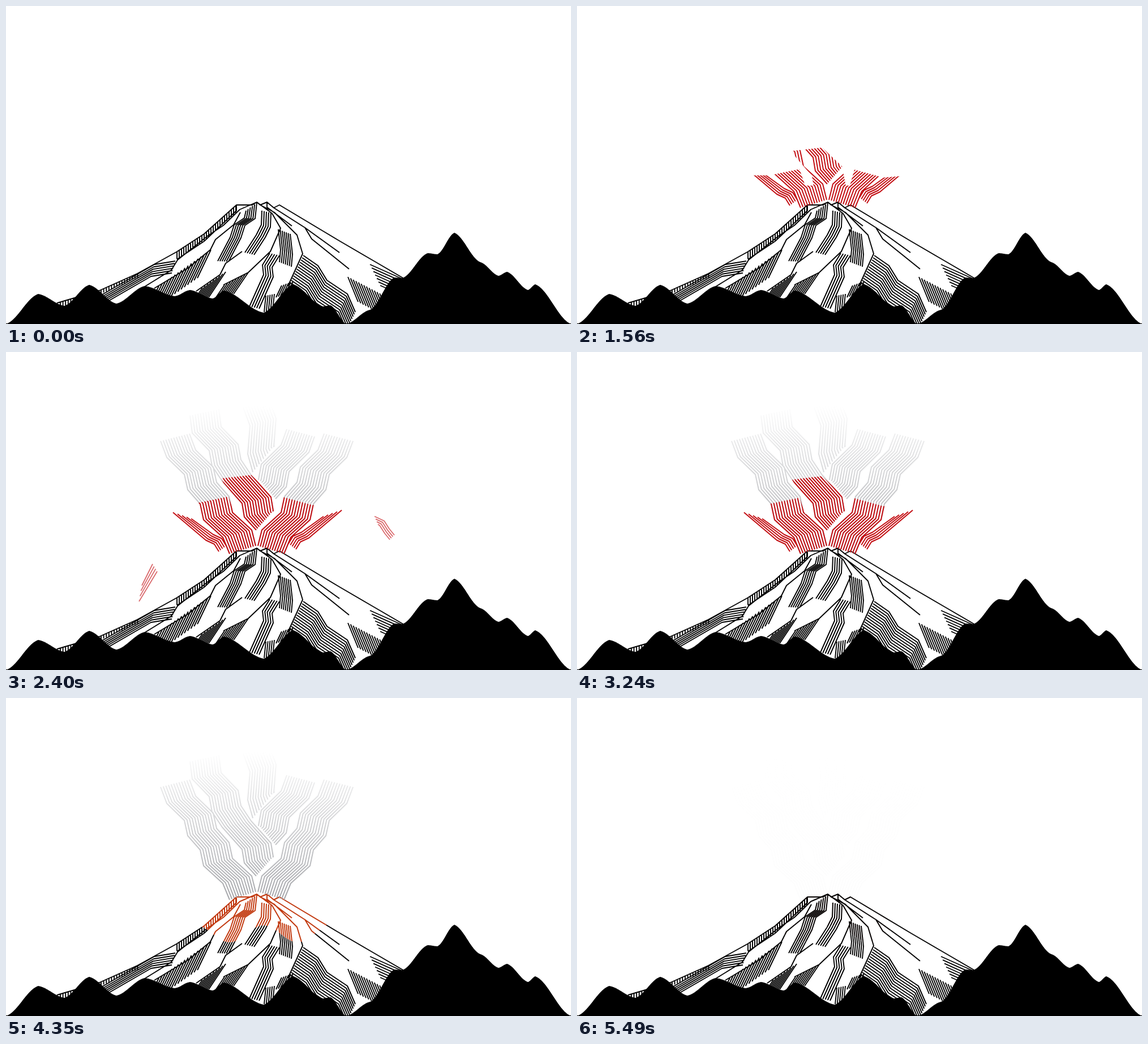
Write an HTML page with a canvas that moves like this. It is 998 px wide and 561 px high and loops after 5520 ms.

```html
<!DOCTYPE html>
<html lang="en">
<head>
<meta charset="utf-8">
<title>Volcano</title>
<style>
html, body { margin: 0; width: 100%; height: 100%; overflow: hidden; background: #fff; }
canvas { display: block; width: 998px; height: 561px; }
</style>
</head>
<body>
<canvas id="stage" width="998" height="561"></canvas>
<script>
const ctx = document.getElementById('stage').getContext('2d');
const W = 998, H = 561, LOOP = 5520, STEP = 30;
const RED = '#c30f14', ORANGE = [194, 58, 16];
const MIRROR = 885; // x + mirrored x around the crater

const clamp = (v, lo = 0, hi = 1) => Math.max(lo, Math.min(hi, v));
const ramp = (t, a, b) => clamp((t - a) / (b - a));
const ease = p => (1 - Math.cos(Math.PI * p)) / 2;

function line(path, pts) {
  pts.forEach((v, i) => {
    if (i % 2) path[i > 1 ? 'lineTo' : 'moveTo'](pts[i - 1], v);
  });
}

// n parallel copies of a polyline; the last copy may start at its own foot
function sheet(path, n, pts, dx, dy, foot = [pts[0] + dx, pts[1] + dy]) {
  for (let i = 0; i < n; i++) {
    const k = i / (n - 1);
    line(path, pts.map((v, j) => v + k * (j < 2 ? foot[j] - v : j % 2 ? dy : dx)));
  }
}

// height of a polyline at x; bend rounds it off at the key points
function height(pts, x, bend = 0) {
  let i = 0;
  while (i < pts.length - 4 && x > pts[i + 2]) i += 2;
  const p = ramp(x, pts[i], pts[i + 2]);
  return pts[i + 1] + (pts[i + 3] - pts[i + 1]) * (p + bend * (ease(p) - p));
}

// foreground: peaks and valleys joined by soft slopes
const skyline = [0, 561, 57, 508, 103, 529, 147, 492, 195, 525, 245, 494, 298, 512, 325, 501, 365, 516,
  385, 502, 455, 541, 507, 491, 560, 530, 573, 528, 601, 561, 643, 536, 686, 479, 700, 480, 745, 436,
  762, 438, 792, 400, 838, 452, 870, 476, 885, 469, 922, 501, 935, 491, 998, 561];
const hills = new Path2D();
hills.moveTo(0, H);
for (let x = 0; x <= W; x++) hills.lineTo(x, height(skyline, x, 0.65));
hills.closePath();

// volcano: outline
const cone = new Path2D();
const ridge = [90, 524, 165, 502, 232, 472, 301, 434, 350, 402, 407, 351];
line(cone, [...ridge, 435, 351, 443, 346, 449, 351, 461, 346, 473, 356, 483, 351, 590, 415, 705, 482]);
for (const [from, to, gap, len] of [[302, 407, 4, 13], [168, 233, 4.6, 7], [96, 134, 4.6, 9]])
  for (let x = from; x <= to; x += gap) line(cone, [x, height(ridge, x), x, height(ridge, x) + len]);
line(cone, [302, 447, 350, 415, 407, 361, 407, 351]);

// folds running down from the crater
line(cone, [443, 346, 413, 359, 384, 387, 357, 405, 303, 448, 292, 466, 245, 495]);
line(cone, [414, 364, 402, 386, 370, 412, 361, 430, 322, 462, 262, 498]);
line(cone, [443, 346, 470, 366, 485, 392, 467, 433, 428, 470, 384, 492]);
line(cone, [461, 346, 461, 355, 505, 388]);
line(cone, [449, 351, 474, 364, 514, 404, 524, 437, 498, 494]);
line(cone, [473, 356, 528, 391, 540, 411, 606, 464]);
line(cone, [528, 391, 589, 435]);
line(cone, [417, 433, 388, 454, 378, 474, 336, 503]);

// hatched faces, left to right
sheet(cone, 6, [165, 512, 262, 456, 299, 450], -6, 21);
sheet(cone, 17, [362, 430, 338, 480], -92, 64);
sheet(cone, 6, [424, 361, 421, 374, 403, 386, 396, 408, 374, 450], 19, 1, [443, 347]);
sheet(cone, 9, [388, 469, 358, 514], -41, 28);
sheet(cone, 9, [428, 470, 402, 508], -42, 22);
sheet(cone, 5, [452, 361, 451, 386, 442, 404, 422, 435], 16, 4);
sheet(cone, 5, [466, 436, 453, 457, 455, 474, 430, 530], 17, 4);
sheet(cone, 7, [481, 394, 485, 430, 483, 452], 21, 8);
sheet(cone, 5, [459, 511, 456, 540], 15, -3);
sheet(cone, 6, [487, 493, 477, 514], 20, -7);
sheet(cone, 13, [525, 440, 551, 458, 567, 484, 603, 508, 617, 540], -23, 48);
sheet(cone, 13, [604, 478, 622, 522], 56, 29);
sheet(cone, 7, [643, 456, 699, 481], 18, 37);

// plume: the right side mirrors the left
const smoke = new Path2D(), lava = new Path2D();
const side = new Path2D(), mid = new Path2D(), wing = new Path2D();
sheet(side, 12, [395, 356, 383, 327, 349, 296, 343, 268, 321, 243, 315, 216, 284, 186, 273, 157],
  51, -13, [441, 342]);
sheet(mid, 12, [442, 314, 421, 291, 417, 267, 382, 228, 364, 201, 359, 174, 329, 143, 325, 112],
  51, -11, [471, 281]);
sheet(wing, 5, [295, 283, 353, 332, 368, 339, 376, 352], 13, -10, [327, 294]);
for (const p of [smoke, lava]) {
  p.addPath(mid);
  p.addPath(side);
  p.addPath(side, { a: -1, d: 1, e: MIRROR + 1, f: 0 });
}
sheet(smoke, 11, [436, 212, 427, 180, 431, 130, 419, 98], 46, -13, [474, 165]);
sheet(smoke, 12, [476, 259, 495, 238, 500, 211, 535, 177, 545, 149], -49, -13, [446, 224]);
lava.addPath(wing);
lava.addPath(wing, { a: -1, d: 1, e: MIRROR + 3, f: -4 });

const [rockA, rockB, rockC] = [0, 0, 0].map(() => new Path2D());
sheet(rockA, 4, [217, 330, 227, 315], 6, 9, [209, 351]);
sheet(rockB, 4, [240, 412, 259, 374], 8, 13, [235, 440]);
sheet(rockC, 4, [621, 270, 638, 278, 647, 292, 656, 303], -8, 8, [627, 284]);

const grey = ctx.createLinearGradient(0, 350, 0, 95);
grey.addColorStop(0, '#a7a8ac');
grey.addColorStop(1, '#fff');

function stroke(path, color, width = 2) {
  ctx.strokeStyle = color;
  ctx.lineWidth = width;
  ctx.stroke(path);
}

function clipped(mask, draw) {
  ctx.save();
  ctx.clip(mask);
  draw();
  ctx.restore();
}

// wavy-edged heat spreading from the crater
function drawGlow(t, life) {
  const s = ramp(t, 3430, 4350);
  if (!s) return;
  const mask = new Path2D();
  const add = (x, y) => mask.lineTo(450 + (x - 450) * s, 345 + (y - 345) * s);
  add(346, 333);
  for (let x = 346; x <= 566; x += 4) add(x, 416 + 15 * Math.cos((x - 395) / 60 * Math.PI));
  add(566, 333);
  clipped(mask, () => {
    ctx.fillStyle = '#fff';
    ctx.fillRect(300, 320, 300, 130);
    stroke(cone, `rgb(${ORANGE.map(v => Math.round(v * life))})`);
  });
}

function drawSmoke(t, life) {
  const s = clamp((t - 1710) / 330, 0, 2.5);
  if (!s) return;
  const mask = new Path2D();
  mask.ellipse(450, 240, 120 * s, 74 * s, -0.06, 0, Math.PI * 2);
  ctx.globalAlpha = life;
  clipped(mask, () => stroke(smoke, grey));
  ctx.globalAlpha = 1;
}

// a silhouette of the flames rises and sinks, uncovering the lines
function drawLava(t) {
  const shown = ease(ramp(t, 1125, 1760)) - ease(ramp(t, 3210, 3600));
  if (!shown) return;
  const drop = 145 * (1 - shown), mask = new Path2D();
  const add = pts => line(mask, pts.map((v, i) => i % 2 ? v + drop : v));
  add([270, 385, 270, 266, 340, 266, 393, 255, 403, 284,
    MIRROR - 403, 284, 490, 256, 541, 270, 610, 264, 610, 385]);
  add([380, 223, 433, 217, 468, 250, 475, 285, 443, 318, 419, 292, 415, 267, 384, 231]);
  clipped(mask, () => stroke(lava, RED));
}

function drawRock(rock, alpha, shift = 0) {
  ctx.save();
  ctx.globalAlpha = alpha;
  ctx.translate(shift * 30, shift * 20);
  stroke(rock, RED, 1.8);
  ctx.restore();
}

function drawRocks(t) {
  const shown = ramp(t, 1830, 1950), late = shown - ramp(t, 2250, 2640);
  drawRock(rockA, shown - ramp(t, 2130, 2250));
  drawRock(rockB, late);
  drawRock(rockC, late, clamp((t - 2040) / 210, -1, 1));
}

function draw(now) {
  const t = Math.floor(now % LOOP / STEP) * STEP;
  const life = 1 - ramp(t, 5100, 5500);
  ctx.fillStyle = '#fff';
  ctx.fillRect(0, 0, W, H);
  ctx.lineJoin = 'round';
  stroke(cone, '#000', 1.9);
  drawGlow(t, life);
  drawSmoke(t, life);
  drawLava(t);
  drawRocks(t);
  ctx.fillStyle = '#000';
  ctx.fill(hills);
  ctx.fillRect(0, H - 1, W, 1);
}

let start;
function tick(now) {
  start ??= now;
  draw(now - start);
  requestAnimationFrame(tick);
}
draw(0);
requestAnimationFrame(tick);
</script>
</body>
</html>
```
